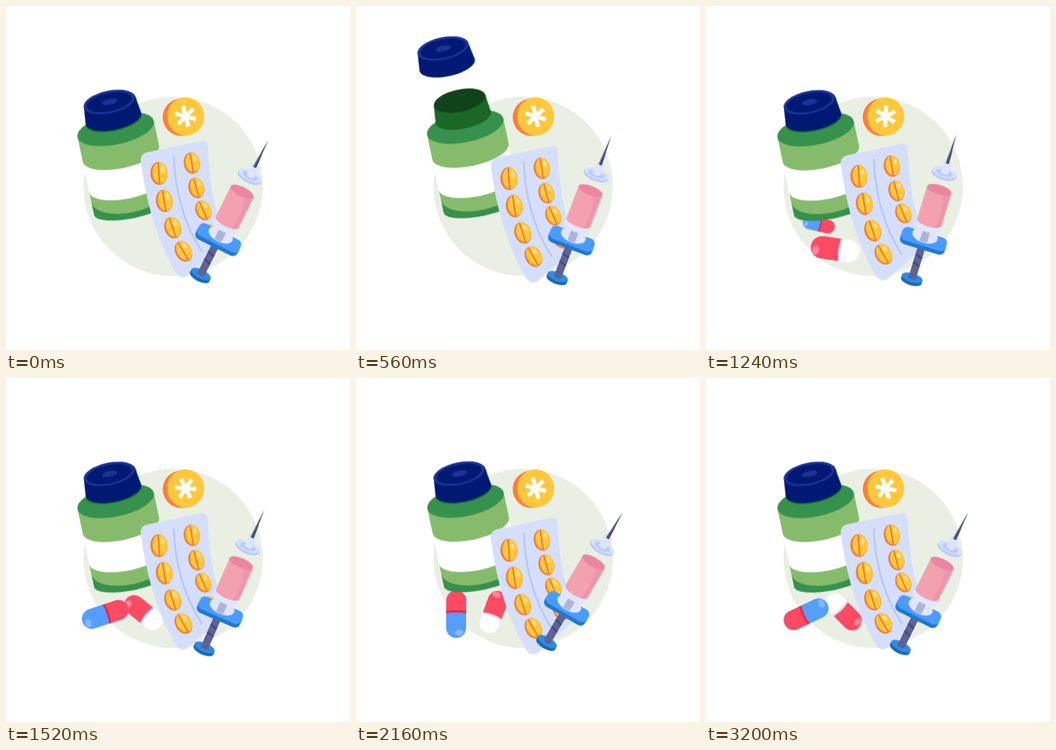
These frames come from a looping animation (450 by 450 pixels, 3.24 s). An HTML page:

```html
<!DOCTYPE html>
<html lang="en">
<head>
<meta charset="utf-8">
<title>Medicine</title>
<style>
  html, body { margin: 0; width: 100%; height: 100%; overflow: hidden; background: #fff; }
  svg { display: block; width: 100%; height: 100%; }

  .anim { animation: 3240ms ease-in-out infinite; }
  .linear { animation-timing-function: linear; }

  .bottle { animation-name: hop; }
  @keyframes hop {
    0%, 4% { transform: translate(0, 0); }
    9.88% { transform: translate(0, 1.3px); }
    14% { transform: translate(-.6px, -3px); }
    33% { transform: translate(-.5px, -2.5px); }
    36.5% { transform: translate(0, .5px); }
    44%, 53% { transform: translate(0, 0); }
    62% { transform: translate(-.3px, -.8px); }
    72%, 100% { transform: translate(0, 0); }
  }

  .lid { animation-name: pop; }
  @keyframes pop {
    0%, 11.11% { transform: translate(0, 0); }
    20.99% { transform: translate(-29px, -94px); animation-timing-function: cubic-bezier(.33, .4, .67, .9); }
    35.8%, 100% { transform: translate(0, 0); }
  }

  .blister { animation-name: bob; animation-duration: 1620ms; }
  @keyframes bob {
    0%, 100% { transform: translate(0, 0); animation-timing-function: cubic-bezier(.37, 0, .63, 1); }
    50% { transform: translate(0, 8.6px); animation-timing-function: cubic-bezier(.37, 0, .63, 1); }
  }

  .star { animation-name: turn; }
  @keyframes turn { from { transform: rotate(-15deg); } to { transform: rotate(345deg); } }

  .syringe { animation-name: swing; }
  @keyframes swing {
    0% { transform: translate(298.5px, 264px) rotate(26.6deg); }
    11.11% { transform: translate(298px, 262.3px) rotate(12deg); }
    22.22% { transform: translate(298.5px, 264px) rotate(26.6deg); }
    33.33% { transform: translate(298px, 262.3px) rotate(12deg); }
    44.44% { transform: translate(298.4px, 263.5px) rotate(24.3deg); }
    55.56% { transform: translate(298px, 262.5px) rotate(15.2deg); }
    67.9% { transform: translate(299px, 261px) rotate(30.5deg); }
    74.07%, 80% { transform: translate(301px, 257.5px) rotate(26.4deg); }
    91%, 100% { transform: translate(298.5px, 264px) rotate(26.6deg); }
  }

  .plunger { animation-name: push; }
  @keyframes push {
    0%, 67.9% { transform: translate(0, 0); }
    74.07%, 80% { transform: translate(0, -2.5px); }
    91%, 100% { transform: translate(0, 0); }
  }

  .blue-out { animation-name: blueOut; }
  @keyframes blueOut {
    0%, 35.8% { transform: translate(160px, 262px) scale(0); }
    38.27% { transform: translate(148px, 285.5px) scale(.68); animation-timing-function: ease-out; }
    41.98% { transform: translate(113px, 312px) scale(1.12); }
    48.15%, 100% { transform: translate(131px, 309px) scale(1); }
  }
  .white-out { animation-name: whiteOut; }
  @keyframes whiteOut {
    0%, 34.57% { transform: translate(160px, 262px) scale(0); }
    38.27% { transform: translate(169px, 318px) scale(1.13); animation-timing-function: ease-out; }
    40.74% { transform: translate(175px, 322px) scale(1.13); }
    48.15%, 100% { transform: translate(180px, 306px) scale(1); }
  }
  .spin-left { animation-name: spinLeft; }
  @keyframes spinLeft { from { transform: rotate(150.4deg); } to { transform: rotate(-209.6deg); } }
  .spin-right { animation-name: spinRight; }
  @keyframes spinRight { from { transform: rotate(50deg); } to { transform: rotate(410deg); } }

  .drop { animation-name: spray; fill: #ff4a5f; }
  @keyframes spray {
    0%, 70.37% { transform: translate(0, 0) scale(0); animation-timing-function: ease-out; }
    79.01% { transform: translate(var(--d), 0) scale(1); animation-timing-function: linear; }
    83.95% { transform: translate(calc(var(--d) * 1.18), 0) scale(1); }
    86.1%, 100% { transform: translate(calc(var(--d) * 1.2), 0) scale(0); }
  }
</style>
</head>
<body>
<svg viewBox="0 0 450 450">
  <defs>
    <g id="tablet">
      <ellipse rx="11.2" ry="15" fill="#f5803a"/>
      <ellipse cx="1.4" cy="-.6" rx="9.7" ry="13.9" fill="#ffc83a"/>
      <ellipse cx="5" cy="-5.5" rx="2.6" ry="4.2" fill="#ffdf86" transform="rotate(-12 5 -5.5)"/>
      <path d="M0-14V14" stroke="#f0792f" stroke-width="2"/>
    </g>
  </defs>

  <circle cx="218.7" cy="236" r="117.3" fill="#eaefe4"/>

  <g class="anim white-out"><g class="anim linear spin-right">
    <rect x="-28.5" y="-13" width="57" height="26" rx="13" fill="#fff"/>
    <path d="M-8-13H-4V13H-8Q-5 0-8-13Z" fill="#dfe4fb"/>
    <path d="M-5-13H15.5a13 13 0 0 1 0 26H-5Q-2 0-5-13Z" fill="#ff4a63"/>
    <ellipse cx="22.5" cy="-4" rx="4" ry="5.5" fill="#ff8799"/>
  </g></g>

  <g class="anim blue-out"><g class="anim linear spin-left">
    <rect x="-31" y="-13" width="62" height="26" rx="13" fill="#559dff"/>
    <path d="M1-13H18a13 13 0 0 1 0 26H1Q4 0 1-13Z" fill="#ff4a63"/>
    <path d="M1-13H4Q7 0 4 13H1Q4 0 1-13Z" fill="#d92f4c"/>
    <ellipse cx="-24" cy="4" rx="4" ry="5.5" fill="#83b9ff"/>
  </g></g>

  <g class="anim bottle">
    <g transform="translate(143.5 161) rotate(-12)">
      <path d="M-51 0V104A51 15 0 0 0 51 104V0Z" fill="#36914c"/>
      <path d="M-51 0V87A51 24 0 0 0 51 87V0Z" fill="#86bb6c"/>
      <path d="M-51 33A51 19 0 0 0 51 33V74A51 18.500 0 0 1-51 74Z" fill="#fff"/>
      <ellipse rx="51" ry="20" fill="#36914c"/>
      <path d="M-34.500-35L-37-12A37 14 0 0 0 37-12L34.500-35Z" fill="#1a6726"/>
      <ellipse cy="-35" rx="34.500" ry="14.500" fill="#10431a"/>
    </g>
    <g class="anim lid">
      <g transform="translate(143.5 161) rotate(-12)">
        <path d="M-34.700-36.500L-37-14A37 14.500 0 0 0 37-14L33-36.500Z" fill="#001a74"/>
        <ellipse cx="-.9" cy="-36.500" rx="34" ry="14.700" fill="#1e3296"/>
        <ellipse cx="-.9" cy="-36.300" rx="30" ry="12" fill="#001a74"/>
        <ellipse cx="-.4" cy="-36.500" rx="10" ry="3.800" fill="#1e3296"/>
      </g>
    </g>
  </g>

  <g>
    <circle cx="229.3" cy="145.5" r="24.3" fill="#ff7f39"/>
    <ellipse cx="235" cy="144.5" rx="24.2" ry="25" fill="#ffc83c"/>
    <g transform="translate(235 144.3)">
      <path class="anim linear star" d="M0-14V14M-12.1-7L12.1 7M-12.1 7L12.1-7" stroke="#fff" stroke-width="5.4"/>
    </g>
  </g>

  <g class="anim blister">
    <path d="M176.5 204Q175 194 184 191.5L255 176.5Q263 175 264 184C266 225 270 262 287 300Q289 308 282 314L239 352Q230 359 223 350C200 312 184 262 176.5 204Z" fill="#d5dffc"/>
    <path d="M219.5 197C221 240 232 285 256 320.5" fill="none" stroke="#b5c5f7" stroke-width="2.2" stroke-linecap="round"/>
    <g id="tablets"></g>
  </g>

  <g class="anim syringe">
    <g class="anim plunger">
      <rect x="-5" y="40" width="10" height="56" fill="#5d6297"/>
      <path d="M-5 66L5 69M-5 77L5 80" stroke="#3f447a" stroke-width="2.2"/>
      <path d="M-14 97V101A14 6 0 0 0 14 101V97Z" fill="#1668b5"/>
      <ellipse cy="97" rx="14" ry="6" fill="#2f8ae4"/>
      <path d="M-5 88V97A5 2 0 0 0 5 97V88Z" fill="#5d6297"/>
    </g>
    <rect x="-30.5" y="40" width="61" height="18" rx="7" fill="#1f78d1"/>
    <rect x="-30.5" y="35" width="61" height="18" rx="7" fill="#4a9bff"/>
    <ellipse cy="39.5" rx="17" ry="9.5" fill="#dfe6fc"/>
    <path d="M-5 28H5V46A5 2.5 0 0 1-5 46Z" fill="#adb4d8"/>
    <path d="M-17 18V28A17 6.5 0 0 0 17 28V18Z" fill="#e1e6fb"/>
    <path d="M-16.5-23.500V21A16.500 6 0 0 0 16.500 21V-23.500Z" fill="#f3a1b1"/>
    <path d="M16.500-23.500V21Q14 25 9 26Q14 0 6-18Z" fill="#ee95a9"/>
    <ellipse cy="-23.500" rx="16.500" ry="6.300" fill="#ea86a0"/>
    <ellipse cy="-45" rx="17" ry="8" fill="#b9c9fa"/>
    <ellipse cy="-47" rx="16.500" ry="7" fill="#d6e1ff"/>
    <ellipse cy="-46.500" rx="11" ry="4.500" fill="#b9c9fa"/>
    <path d="M-5.500-61V-47A5.500 2.500 0 0 0 5.500-47V-61A5.500 2 0 0 0-5.500-61Z" fill="#dce5ff"/>
    <path d="M-2.200-60L0-99.500L2.200-60A2.200 1 0 0 1-2.200-60Z" fill="#5a608f"/>
    <path d="M0-99.500L2.200-60L.4-59Z" fill="#30365f"/>
  </g>

  <g id="drops" transform="translate(345 170)"></g>
</svg>
<script>
  // x, y, tilt, scale
  const tablets = [
    [200, 219, -4, 1], [207, 255, -9, .98], [218, 290, -18, .96], [232, 321, -30, .95],
    [243, 205.5, -9, .94], [249, 238, -15, .92], [258, 267.5, -24, .9], [268, 298, -32, .88]
  ];
  document.getElementById('tablets').innerHTML = tablets.map(([x, y, tilt, k]) =>
    `<use href="#tablet" transform="translate(${x} ${y}) rotate(${tilt}) scale(${k})"/>`).join('');

  // direction, distance, length, width
  const drops = [[253, 59, 14, 6], [-13, 47, 17, 8], [161, 42, 19, 9], [72, 42, 24, 10]];
  document.getElementById('drops').innerHTML = drops.map(([angle, d, len, w]) => {
    const h = len / 2;
    return `<g transform="rotate(${angle})"><path class="anim drop" style="--d:${d}px"
      d="M${-h} 0C${-h / 3} ${-w * .25} 0 ${-w * .6} ${h * .6} ${-w * .55}C${h * 1.1} ${-w * .5} ${h * 1.1} ${w * .45} ${h * .6} ${w * .5}C0 ${w * .6} ${-h / 2} ${w * .4} ${-h} 0Z"/></g>`;
  }).join('');
</script>
</body>
</html>
```
